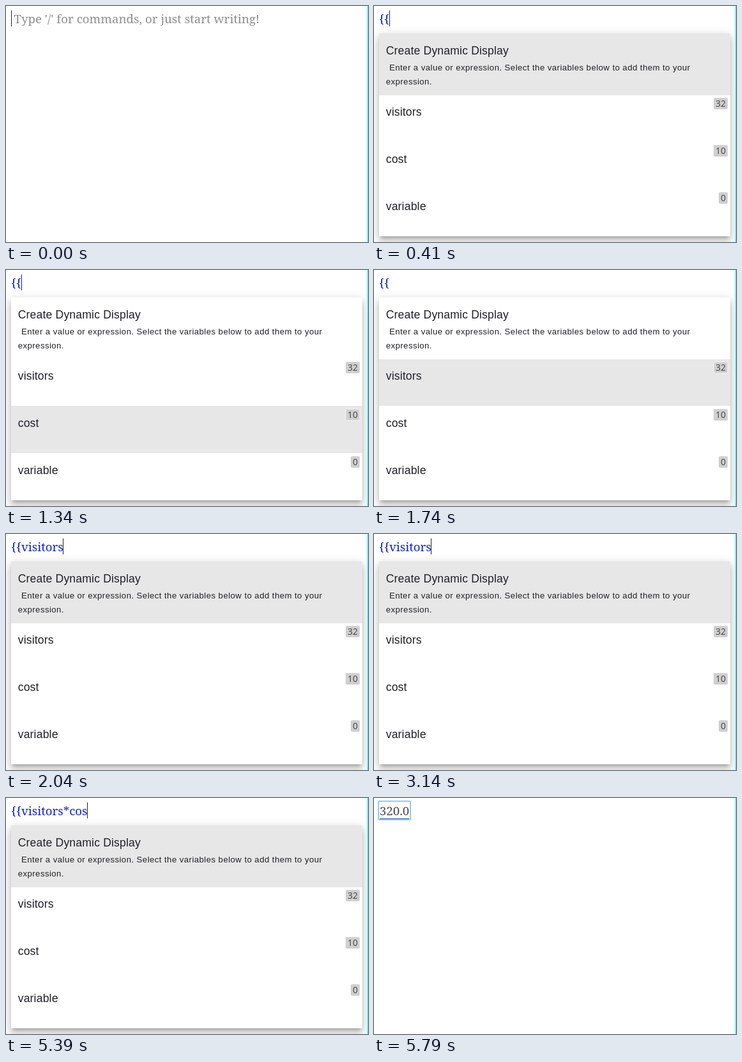
An HTML page that plays this animation: 567 by 370 pixels, repeating every 7.09 s.

```html
<!DOCTYPE html>
<html lang="en">
<head>
<meta charset="utf-8">
<title>Dynamic display</title>
<style>
  html, body { margin: 0; width: 100%; height: 100%; overflow: hidden; background: #fff; }
  #stage { position: relative; width: 567px; height: 370px; overflow: hidden; background: #fff; }
  #shadow {
    position: absolute; left: 8px; top: 43px; width: 550px; height: 318px; background: #fff;
    box-shadow: 0 5px 5px -3px rgba(0,0,0,.2), 0 8px 10px 1px rgba(0,0,0,.14), 0 3px 14px 2px rgba(0,0,0,.12);
  }
  svg { position: absolute; left: 0; top: 0; display: block; }
  text { white-space: pre; }
  .editor { font: 18.7px "Noto Serif", serif; }
  .title { font: 17.6px "Liberation Sans", Arial, sans-serif; letter-spacing: .165px; fill: #1f2028; }
  .hint { font: 13.2px "Liberation Sans", Arial, sans-serif; letter-spacing: .44px; fill: #1f2028; }
  .value { font: 14px "Noto Sans", sans-serif; fill: #4c4c4c; }
  .badge { fill: #d0d0d0; }
  .active .badge { stroke: #f6f6f6; stroke-width: 1; }
  .back { fill: #fff; }
  .active .back { fill: #e7e7e7; }
</style>
</head>
<body>
<div id="stage">
  <div id="shadow"></div>
  <svg width="567" height="370" viewBox="0 0 567 370">
    <rect x="566" width="1" height="370" fill="#0ff"/>
    <g id="menu">
      <g class="item">
        <rect class="back" x="8" y="43" width="550" height="97"/>
        <text class="title" x="18.7" y="76">Create Dynamic Display</text>
        <text class="hint" x="24" y="101">Enter a value or expression. Select the variables below to add them to your</text>
        <text class="hint" x="18.7" y="123">expression.</text>
      </g>
    </g>
    <text id="placeholder" class="editor" x="12.5" y="27" fill="#8e8e8e">Type '/' for commands, or just start writing!</text>
    <text id="typed" class="editor" x="8" y="27" fill="#1324c8"></text>
    <rect id="caret" y="7" width="1" height="25"/>
    <g id="result">
      <rect x="7" y="5" width="50" height="29" rx="1" fill="none" stroke="#90caf9" stroke-width="2"/>
      <rect x="9" y="32" width="46" height="1" fill="#1b5fae"/>
      <text class="editor" x="8.8" y="27" fill="#4a4a4a">320.0</text>
    </g>
  </svg>
</div>
<script>
const LOOP = 7090, MENU_OPEN = 410, DONE = 5790;
const $ = id => document.getElementById(id);

// Variable rows: name, current value, top, height
$('menu').innerHTML += [['visitors', 32, 140, 73], ['cost', 10, 213, 74], ['variable', 0, 287, 74]]
  .map(([name, value, top, height], i) => {
    const y = 139 + 74 * i, width = 6 + 8 * String(value).length;
    return `<g class="item">
      <rect class="back" x="8" y="${top}" width="550" height="${height}"/>
      <text class="title" x="18.7" y="${y + 33}">${name}</text>
      <rect class="badge" x="${554 - width}" y="${y + 5}" width="${width}" height="18" rx="2"/>
      <text class="value" x="${557 - width}" y="${y + 19}">${value}</text>
    </g>`;
  }).join('');
const items = [...document.querySelectorAll('.item')];

// time, typed text, caret x (null = hidden), highlighted item
const HEAD = 0, VISITORS = 1, COST = 2;
const steps = [
  [0, '', 8, HEAD],
  [40, '', null, HEAD],
  [210, '{', 16, HEAD],
  [410, '{{', 24, HEAD],
  [940, '{{', null, HEAD],
  [990, '{{', null, VISITORS],
  [1140, '{{', null, COST],
  [1340, '{{', 24, COST],
  [1640, '{{', 24, VISITORS],
  [1740, '{{', null, VISITORS],
  [2040, '{{visitors', 89, HEAD],
  [2490, '{{visitors', null, HEAD],
  [3140, '{{visitors', 89, HEAD],
  [3440, '{{visitors*', 99, HEAD],
  [3590, '{{visitors*', null, HEAD],
  [4440, '{{visitors*', 99, HEAD],
  [4940, '{{visitors*', null, HEAD],
  [5140, '{{visitors*c', 108, HEAD],
  [5190, '{{visitors*co', 119, HEAD],
  [5390, '{{visitors*cos', 127, HEAD],
  [5640, '{{visitors*cost', 134, HEAD],
  [DONE, '', null, HEAD]
];

const show = (id, on) => { $(id).style.visibility = on ? 'visible' : 'hidden'; };
let current;

function render(time) {
  const step = steps.findLast(s => s[0] <= time);
  if (step === current) return;
  current = step;
  const [start, text, caretX, active] = step;
  const open = start >= MENU_OPEN && start < DONE;
  show('menu', open);
  show('shadow', open);
  show('placeholder', start < 210);
  show('result', start >= DONE);
  show('caret', caretX !== null);
  if (caretX !== null) $('caret').setAttribute('x', caretX);
  $('caret').setAttribute('fill', text === '{{' ? '#1324a8' : '#222');
  $('typed').textContent = text;
  items.forEach((item, i) => item.classList.toggle('active', i === active));
}

const origin = performance.now();
function tick() {
  render((performance.now() - origin) % LOOP);
  requestAnimationFrame(tick);
}
tick();
</script>
</body>
</html>
```
